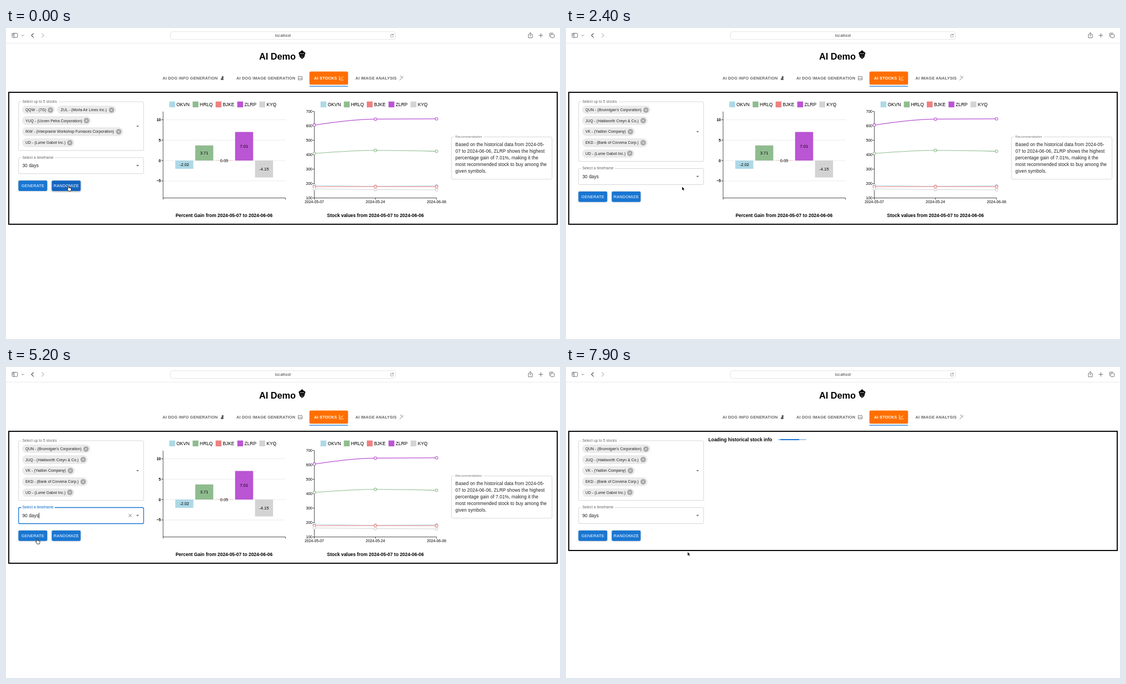
Write an HTML page that moves like this. It is 998 by 561 pixels and loops after 8 s.

```html
<!DOCTYPE html>
<html lang="en">
<head>
<meta charset="utf-8">
<title>AI Demo</title>
<style>
html, body { margin: 0; width: 100%; height: 100%; overflow: hidden; background: #fff; }
#stage { position: relative; width: 998px; height: 561px; overflow: hidden; font-family: "Liberation Sans", Arial, sans-serif; }
svg { display: block; }
#stage > svg { position: absolute; left: 0; top: 0; }
text { white-space: pre; }
.b { font-weight: 700; }
.body { font-size: 8.3px; letter-spacing: .078px; fill: #212121; }
.label { font-size: 6.6px; letter-spacing: .06px; fill: #666; }
.tab { font: 700 7.25px "Liberation Sans", sans-serif; letter-spacing: .205px; fill: #666; }
.btn { font-size: 7.28px; letter-spacing: .208px; fill: #fff; }
.line { fill: none; stroke-linecap: round; stroke-linejoin: round; }
#chips { position: absolute; left: 29px; top: 139.7px; width: 190px; display: flex; flex-wrap: wrap; gap: 4.1px; }
.chip { display: flex; align-items: center; gap: 3px; height: 15.65px; padding: 0 3px 0 6px; border-radius: 8px;
  background: #ebebeb; color: #212121; font-size: 6.8px; letter-spacing: .075px; white-space: nowrap; }
#bar { position: absolute; left: 381.5px; top: 129.7px; width: 51.7px; height: 2.1px; background: #a7caed; overflow: hidden; }
#bar div { position: absolute; top: 0; bottom: 0; left: -200%; right: 100%; background: #1976d2; }
</style>
</head>
<body>
<div id="stage">
<svg width="998" height="561" viewBox="0 0 998 561">
  <!-- browser toolbar -->
  <path d="M0 27.3H998" stroke="#e2e2e2" stroke-width=".8"/>
  <rect x="296.5" y="6.7" width="405" height="14" rx="3.2" fill="#fff" stroke="#dedede" stroke-width=".8"/>
  <text x="499" y="16.3" text-anchor="middle" font-size="6.7" fill="#333" style="font-family:Inter,sans-serif">localhost</text>
  <g class="line" stroke="#666" stroke-width=".9">
    <rect x="11" y="9.5" width="9.8" height="7.6" rx="1.3"/><path d="M14.4 9.5v7.6M12.2 11.4h1M12.2 13h1"/>
    <path d="M28.4 12.7l1.7 1.7 1.7-1.7"/>
    <path d="M49.4 10l-3.6 3.4 3.6 3.4" stroke="#444" stroke-width="1.1"/>
    <path d="M64.6 10l3.6 3.4-3.6 3.4" stroke="#bbb" stroke-width="1.1"/>
    <path d="M697.3 12a2.7 2.7 0 1 0 .6 2.4M697.8 10.6v1.7h-1.8" stroke-width=".7"/>
    <path d="M942.6 11.7h-1.5v6h7v-6h-1.5M944.6 14.8V8.4M942.7 10.2l1.9-1.9 1.9 1.9"/>
    <path d="M963.5 9.8v7M960 13.3h7"/>
    <rect x="981.2" y="11.3" width="6.4" height="6.2" rx="1"/><path d="M979.2 15.2v-5q0-1 1-1h5.2"/>
  </g>

  <text class="b" x="456" y="57" font-size="16.3">AI Demo</text>
  <g>
    <path d="M527.3 46q0-2.4 3.2-3.2Q531 40.4 533.3 40.4T536 42.8q3.3.8 3.3 3.2l-1.2 2.8q.3 4-4.8 7-5-3-4.8-7z"/>
    <path d="M529.5 46.3h7.6M531 50.3h1.3M534.4 50.3h1.3M532 52.8h2.6" stroke="#fff" stroke-width=".8"/>
  </g>

  <!-- tabs -->
  <rect x="546.6" y="78.6" width="69.6" height="23.6" rx="2.5" fill="#ff6f00"/>
  <path d="M546.6 105.2h69.6" stroke="#1976d2" stroke-width="1.3"/>
  <text class="tab" x="282" y="93.1">AI DOG INFO GENERATION</text>
  <text class="tab" x="415" y="93.1">AI DOG IMAGE GENERATION</text>
  <text class="tab" x="555" y="93.1" style="fill:#fff">AI STOCKS</text>
  <text class="tab" x="629.5" y="93.1">AI IMAGE ANALYSIS</text>
  <path d="M389 86.7l2.5.6.8 1.5-1 .8.6 4.2h-5q-.6-2.4 1.6-3.6z" fill="#555"/>
  <g class="line" stroke="#666" stroke-width=".8">
    <rect x="526.5" y="87.4" width="7" height="6.2" rx=".6"/><path d="M527.5 92.3l1.7-2.1 1.2 1.3 1-1.1 1.4 1.9"/>
    <path d="M600.7 86.5v7.3h7M602 91.6l1.6-2 1.4 1 2.3-3" stroke="#fff"/>
    <path d="M709.4 94l4.2-4.8M712 87.6l3 2.8M714.8 86.7l.6.6M710.8 87h1"/>
  </g>

  <rect id="panel" x="5" y="116" width="988" height="238" fill="none" stroke="#000" stroke-width="1.9"/>

  <!-- stock picker -->
  <rect id="picker" x="22.7" y="133" width="225.2" height="107.7" rx="2.2" fill="none" stroke="#c4c4c4" stroke-width=".7"/>
  <path d="M27.4 133H95" stroke="#fff" stroke-width="2"/>
  <text class="label" x="29.4" y="134.9">Select up to 5 stocks</text>
  <path id="pickArrow" d="M234.5 186h5.2l-2.6 2.6z" fill="#757575"/>

  <g id="form">
    <rect id="field" x="22.7" y="253.5" width="225.2" height="29" rx="2.2" fill="none"/>
    <path d="M27.4 253.5H88" stroke="#fff" stroke-width="2"/>
    <text id="fieldLabel" class="label" x="29.4" y="255.3">Select a timeframe</text>
    <rect id="selection" x="29" y="262.8" width="30.5" height="10.4" fill="#b3d7fe"/>
    <text id="value" class="body" x="29.4" y="270.9"></text>
    <path id="caret" d="M59.4 263v10" stroke="#000" stroke-width=".8"/>
    <path id="clear" class="line" d="M221.3 265.6l4.8 4.8m0-4.8l-4.8 4.8" stroke="#666" stroke-width=".9"/>
    <path id="openArrow" fill="#757575"/>
    <g id="buttons"></g>
  </g>

  <g id="charts"></g>
  <text id="loading" class="b" x="256.6" y="133.5" font-size="8.45">Loading historical stock info</text>

  <g id="menu"></g>
  <circle id="ring" r="15.6" fill="#fff" fill-opacity=".1" stroke="#111" stroke-width=".9"/>
  <g id="pointer" stroke-linejoin="round">
    <path id="hand" d="M-.9.7Q0-.7.9.7V3.3Q2 2.7 2.4 3.5 3.4 3 3.7 4 4.8 3.7 5 4.8V6.3Q5 7.7 4.2 9.2H.2Q-1 7.4-2.5 5.7-2.6 4.6-1.5 4.9L-.9 5.4Z" fill="#fff" stroke="#000" stroke-width=".8"/>
    <path id="arrow" d="M0 0V7L1.6 5.6 2.7 8 3.9 7.5 2.8 5.1H4.9Z" fill="#000" stroke="#fff" stroke-width=".5"/>
  </g>
</svg>
<div id="chips"></div>
<div id="bar"><div></div><div></div></div>
</div>

<script>
const $ = id => document.getElementById(id);
const LOOP = 8000, STEP = 100;
const BLUE = '#1976d2';

const LISTS = [
  [0, ['QQW - (7G)', 'ZUL - (Morla Air Lines Inc.)', 'YUQ - (Uzven Petra Corporation)',
    'IKW - (Interprairie Workshop Furnaces Corporation)', 'UD - (Lume Gabot Inc.)']],
  [300, ['TQ - (Tuem Voice Communications Inc.)', 'EQ - (Larsett & Hombly Co.)',
    'BVYK - (Mirkbeans Corporation)', 'UD - (Lume Gabot Inc.)', 'Y - (Tarn Wheel Company)']],
  [1700, ["QUN - (Brunnigan's Corporation)", 'JUQ - (Haldworth Creyn & Co.)', 'VK - (Yadlon Company)',
    'EKD - (Bank of Corvena Corp.)', 'UD - (Lume Gabot Inc.)']]
];

// name, colour, percent gain, values at the three dates
const SERIES = [
  ['OKVN', '#add8e6', -2.02, [188, 181, 184]],
  ['HRLQ', '#8fbc8f', 3.71, [409, 430, 424]],
  ['BJKE', '#f08080', 0.05, [178, 179, 178]],
  ['ZLRP', '#ba55d3', 7.01, [606, 647, 649]],
  ['KYQ', '#d3d3d3', -4.15, [163, 158, 156]]
];
const DATES = ['2024-05-07', '2024-05-24', '2024-06-06'];

// time, x, y of the pointer tip
const PATH = [
  [900, 112.5, 285], [1100, 113, 301.5], [2100, 113, 301.5], [2400, 209, 286], [2500, 209, 286],
  [2900, 237, 271], [3400, 243, 271], [4000, 243, 271], [4400, 93, 331], [4700, 93, 330], [4900, 93, 326],
  [5200, 56, 310], [5600, 54.5, 308], [7100, 54.5, 308], [7600, 219, 333.5]
];
const CLICKS = [[100, 300], [1300, 1700], [3500, 3700], [4500, 4700], [6500, 6700]];
const LOAD = 6500;

const text = (x, y, str, size, anchor = 'start', cls = '', fill = '#000') =>
  `<text class="${cls}" x="${x}" y="${y}" font-size="${size}" text-anchor="${anchor}" fill="${fill}">${str}</text>`;
const rect = (x, y, w, h, fill, extra = '') =>
  `<rect x="${x}" y="${y}" width="${w}" height="${h}" fill="${fill}" ${extra}/>`;
const path = (d, stroke = '#000', width = .7) =>
  `<path d="${d}" fill="none" stroke="${stroke}" stroke-width="${width}"/>`;

function legend(x) {
  const offsets = [0, 42, 83.4, 122.5, 162.2];
  return SERIES.map(([name, color], i) =>
    rect(x + offsets[i], 132.6, 10.5, 10.5, color) + text(x + offsets[i] + 12.9, 140.8, name, 8.4)).join('');
}

function barChart() {
  const y = v => 239.1 - v * 7.36;
  let out = legend(294.2);
  for (const v of [10, 5, 0, -5])
    out += path(`M283 ${y(v)}H503.5`, '#e4e4e4') + path(`M280 ${y(v)}h3`) +
      text(279, y(v) + 2.5, String(v).replace('-', '−'), 7, 'end', 'b');
  SERIES.forEach(([, color, gain], i) => {
    out += rect(305 + i * 35.9, Math.min(y(0), y(gain)), 32.5, Math.abs(gain) * 7.36, color);
    out += text(321.2 + i * 35.9, y(gain / 2) + 2.6, gain, 7.5, 'middle');
  });
  out += path('M283 150.8V309.5M283 306.6H503.4V309.5');
  return out + text(392.8, 341.2, `Percent Gain from ${DATES[0]} to ${DATES[2]}`, 8.46, 'middle', 'b');
}

// monotone cubic through three evenly spaced points
function curve(x, y, h) {
  const a = (y[1] - y[0]) / h, b = (y[2] - y[1]) / h, k = h / 3;
  const mid = (Math.sign(a) + Math.sign(b)) * Math.min(Math.abs(a), Math.abs(b), Math.abs(a + b) / 4);
  const m0 = (3 * a - mid) / 2, m2 = (3 * b - mid) / 2;
  return `M${x} ${y[0]}C${x + k} ${y[0] + k * m0} ${x + 2 * k} ${y[1] - k * mid} ${x + h} ${y[1]}` +
    `C${x + h + k} ${y[1] + k * mid} ${x + h + 2 * k} ${y[2] - k * m2} ${x + 2 * h} ${y[2]}`;
}

function lineChart() {
  const x0 = 555.4, dx = 110.1, y = v => 332.6 - v * .26;
  let out = legend(566.6) + path(`M${x0} 150.6V306.6H${x0 + 2 * dx}`);
  for (let v = 100; v <= 700; v += 100)
    out += path(`M${x0 - 3} ${y(v)}h3`) + text(551.8, y(v) + 2.5, v, 6.8, 'end');
  DATES.forEach((d, i) => {
    out += path(`M${x0 + i * dx} 306.6v3`) + text(x0 + i * dx, 316.2, d, 6.8, 'middle');
  });
  for (const [, color, , vals] of SERIES) out += path(curve(x0, vals.map(y), dx), color, 1.1);
  for (const [, color, , vals] of SERIES)
    vals.forEach((v, i) => {
      out += `<circle cx="${x0 + i * dx}" cy="${y(v)}" r="2.4" fill="#fff" stroke="${color}" stroke-width="1.1"/>`;
    });
  return out + text(665.5, 341.2, `Stock values from ${DATES[0]} to ${DATES[2]}`, 8.46, 'middle', 'b');
}

function advice() {
  const lines = ['Based on the historical data from 2024-05-', '07 to 2024-06-06, ZLRP shows the highest',
    'percentage gain of 7.01%, making it the', 'most recommended stock to buy among the', 'given symbols.'];
  return rect(802.4, 196.5, 181.2, 76.3, 'none', 'rx="2.2" stroke="#c9c9c9" stroke-width=".7"') +
    path('M807 196.5H861', '#fff', 2) + text(809.2, 198.3, 'Recommendation', 6.2, 'start', '', '#777') +
    lines.map((s, i) => `<text class="body" x="809.6" y="${213.3 + i * 12}">${s}</text>`).join('');
}

function button(id, x, w, label) {
  return `<g id="${id}">${rect(x, 294.9, w, 18.8, BLUE, 'rx="2.1"')}
    <svg x="${x}" y="294.9" width="${w}" height="18.8"><circle cy="9" fill="#fff"/></svg>
    <text class="btn" x="${x + w / 2 + .1}" y="307" text-anchor="middle">${label}</text></g>`;
}

$('charts').innerHTML = barChart() + lineChart() + advice();
$('buttons').innerHTML = button('generate', 22.4, 51.8, 'GENERATE') + button('randomize', 82.5, 51.9, 'RANDOMIZE');
$('menu').innerHTML = rect(22.7, 282.9, 225.2, 64, '#fff', 'rx="2" style="filter:drop-shadow(0 1px 1.3px rgba(0,0,0,.35))"') +
  [30, 60, 90].map((d, i) => rect(22.7, 286.7 + i * 18.7, 225.2, 18.7, '#fff', 'class="opt"') +
    `<text class="body" x="30.4" y="${299 + i * 18.7}">${d} days</text>`).join('');
const options = [...document.querySelectorAll('.opt')];

const cross = '<svg width="10" height="10"><circle cx="5" cy="5" r="4.8" fill="#a6a6a6"/>' +
  '<path d="M3.2 3.2l3.6 3.6m0-3.6L3.2 6.8" stroke="#ebebeb" stroke-width="1"/></svg>';
let shown = null;
function showChips(list) {
  if (list === shown) return;
  shown = list;
  $('chips').innerHTML = list.map(s => `<div class="chip"><span>${s.replace('&', '&amp;')}</span>${cross}</div>`).join('');
}

// indeterminate progress: two bars sweeping, scrubbed by the main clock
const sweep = (el, from, to, easing, delay) => {
  const a = el.animate([{ ...from, easing }, { ...to, offset: .6 }, to],
    { duration: 2100, delay, iterations: Infinity, fill: 'backwards' });
  a.pause();
  return a;
};
const [bar1, bar2] = $('bar').children;
const sweeps = [
  sweep(bar1, { left: '-35%', right: '100%' }, { left: '100%', right: '-90%' }, 'cubic-bezier(.65,.815,.735,.395)', 0),
  sweep(bar2, { left: '-200%', right: '100%' }, { left: '107%', right: '-8%' }, 'cubic-bezier(.165,.84,.44,1)', 1150)
];

const within = (t, a, b) => t >= a && t < b;
const show = (id, on) => { $(id).style.display = on ? '' : 'none'; };
const set = (el, attrs) => { for (const k in attrs) el.setAttribute(k, attrs[k]); };

function pointerAt(t) {
  const i = PATH.findIndex(p => p[0] > t);
  if (i === 0) return PATH[0].slice(1);
  if (i < 0) return PATH[PATH.length - 1].slice(1);
  const [a, x, y] = PATH[i - 1], [b, u, v] = PATH[i];
  const k = (t - a) / (b - a);
  return [x + (u - x) * k, y + (v - y) * k];
}

function paintButton(id, hover, cx, age) {
  const g = $(id);
  set(g.querySelector('rect'), { fill: hover ? '#1565c0' : BLUE });
  g.style.filter = hover ? 'drop-shadow(0 1.2px 1.5px rgba(0,0,0,.4))' : 'drop-shadow(0 .8px .8px rgba(0,0,0,.35))';
  const live = age >= 0 && age < 800;
  set(g.querySelector('circle'), {
    cx, r: live ? Math.min(36, 6 + age * .06) : 0,
    opacity: live ? .3 * Math.min(1, (800 - age) / 400) : 0
  });
}

function render(t) {
  const loading = t >= LOAD, open = within(t, 3600, 4700), focus = within(t, 3500, 6300);
  const hover = within(t, 2700, 3500), rise = t < 300 ? 19.7 : 0;

  showChips(LISTS.filter(l => l[0] <= t).pop()[1]);
  set($('picker'), { height: 107.7 - rise });
  set($('pickArrow'), { transform: `translate(0 ${t < 300 ? -9.8 : 0})` });
  set($('form'), { transform: `translate(0 ${-rise})` });
  set($('panel'), { height: loading ? 215 : 238 });
  show('charts', !loading);
  show('loading', loading);
  show('bar', loading);
  sweeps.forEach(a => { a.currentTime = Math.max(0, t - LOAD + 50); });

  set($('field'), { stroke: focus ? BLUE : hover ? '#212121' : '#c4c4c4', 'stroke-width': focus ? 1.3 : .7 });
  $('fieldLabel').style.fill = within(t, 3500, LOAD) ? BLUE : '';
  $('value').textContent = t < 4700 ? '30 days' : '90 days';
  show('selection', within(t, 3500, 4700));
  show('caret', within(t, 4700, 5300) || within(t, 5800, 6300));
  show('clear', focus || hover);
  set($('openArrow'), { d: open ? 'M234.5 269h5.2l-2.6-2.6z' : 'M234.5 266.8h5.2l-2.6 2.6z' });

  const [x, y] = pointerAt(t);
  show('menu', open);
  options.forEach((o, i) => {
    const over = Math.floor((y - 286.7) / 18.7) === i;
    set(o, { fill: i === 0 ? '#e6ecf7' : over ? '#f5f5f5' : '#fff' });
  });

  paintButton('randomize', t < 2200, 31, t < 1300 ? t - 100 : t - 1300);
  paintButton('generate', within(t, 5300, 7200), 32, t - 6500);

  const hand = t < 2200 || within(t, 2800, 5000) || within(t, 5200, 7200);
  show('hand', hand);
  show('arrow', !hand);
  set($('pointer'), { transform: `translate(${x} ${y})` });
  show('ring', CLICKS.some(([a, b]) => within(t, a, b)));
  set($('ring'), { cx: x + .4, cy: y + 1.4 });
}

const start = performance.now();
function tick() {
  const t = (performance.now() - start) % LOOP;
  render(Math.floor(t / STEP) * STEP);
  requestAnimationFrame(tick);
}
tick();
</script>
</body>
</html>
```
